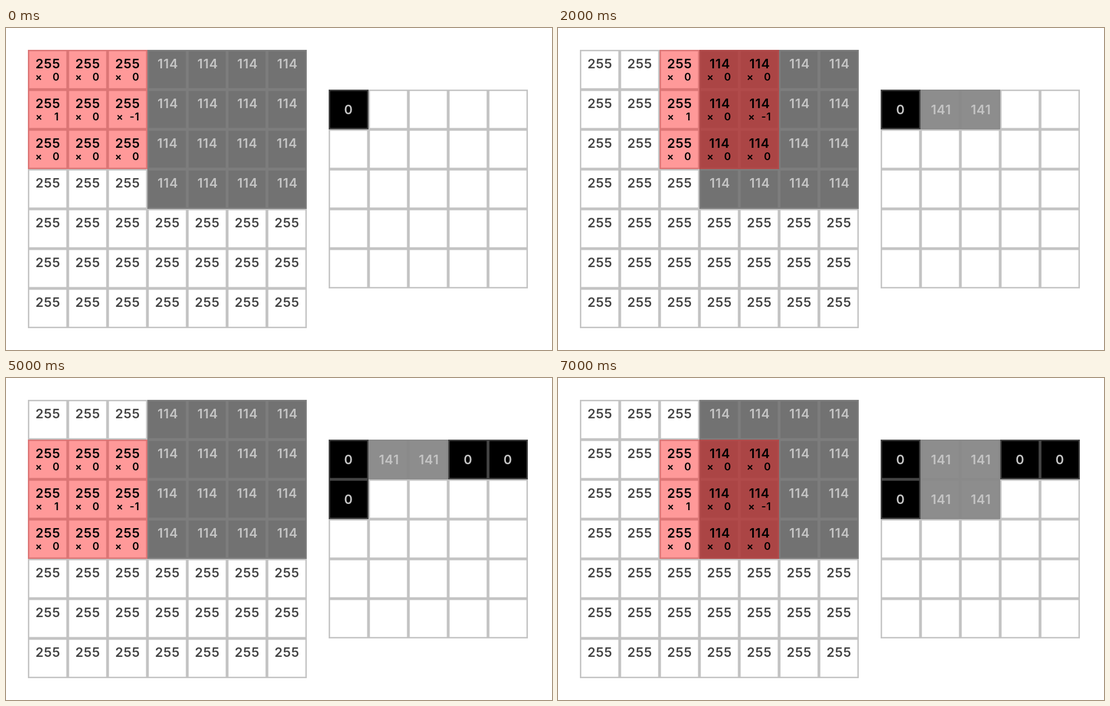
An HTML page with a canvas that plays this animation: 973x575 px, repeating every 8000 ms.

```html
<!DOCTYPE html>
<html lang="en">
<head>
<meta charset="utf-8">
<title>Convolution</title>
<style>
html, body { margin: 0; width: 100%; height: 100%; overflow: hidden; background: #fff; }
canvas { display: block; }
</style>
</head>
<body>
<canvas width="973" height="575"></canvas>
<script>
const ctx = document.querySelector("canvas").getContext("2d");
const CELL = 71, BORDER = 2.5, STEP = 1000, STEPS = 8, OUT = 5;
const INPUT = { x: 39, y: 39 }, OUTPUT = { x: 575, y: 110 };
const KERNEL = [[0, 0, 0], [1, 0, -1], [0, 0, 0]];

const pixel = (row, col) => row < 4 && col > 2 ? 114 : 255;

function convolve(row, col) {
  let sum = 0;
  KERNEL.forEach((line, r) => line.forEach((k, c) => sum += k * pixel(row + r, col + c)));
  return Math.abs(sum);
}

function text(str, x, y, size, color, align = "center") {
  ctx.font = `600 ${size}px Inter, sans-serif`;
  ctx.letterSpacing = "0.7px";
  ctx.textAlign = align;
  ctx.fillStyle = color;
  ctx.fillText(str, x, y);
}

function cell(x, y, value) {
  ctx.fillStyle = `rgb(${value}, ${value}, ${value})`;
  ctx.fillRect(x, y, CELL, CELL);
  ctx.strokeStyle = "rgba(136, 136, 136, 0.5)";
  ctx.lineWidth = BORDER;
  ctx.strokeRect(x + BORDER / 2, y + BORDER / 2, CELL - BORDER, CELL - BORDER);
}

function factor(k, x, y) {
  const signX = k < 0 ? 22 : k ? 20 : 19.5;
  text("×", x + signX, y + 55, 18.5, "#000");
  text(k, x + (k > 0 ? 55.5 : 57), y + 54.5, 18.5, "#000", "right");
}

function inputCell(row, col, k) {
  const x = INPUT.x + col * CELL, y = INPUT.y + row * CELL;
  const value = pixel(row, col), active = k !== undefined;
  cell(x, y, value);
  if (active) {
    ctx.fillStyle = "rgba(255, 0, 0, 0.4)";
    ctx.fillRect(x, y, CELL, CELL);
    factor(k, x, y);
  }
  const color = active ? "#000" : value > 200 ? "#444" : "#c4c4c4";
  const nudge = value === 114 && row !== 2 ? 1 : 0.3;
  text(value, x + CELL / 2 + nudge, y + 32.5, 23, color);
}

function outputCell(index, step) {
  const row = Math.floor(index / OUT), col = index % OUT;
  const x = OUTPUT.x + col * CELL, y = OUTPUT.y + row * CELL;
  if (index > step) return cell(x, y, 255);
  const value = convolve(row, col);
  cell(x, y, value);
  text(value, x + CELL / 2 + (value ? 1 : 0), y + 43.5, 23, "#c4c4c4");
}

function draw(now) {
  const step = Math.floor(now / STEP) % STEPS;
  const top = Math.floor(step / OUT), left = step % OUT;
  ctx.fillStyle = "#fff";
  ctx.fillRect(0, 0, 973, 575);
  for (let row = 0; row < 7; row++)
    for (let col = 0; col < 7; col++)
      inputCell(row, col, KERNEL[row - top]?.[col - left]);
  for (let i = 0; i < OUT * OUT; i++) outputCell(i, step);
  requestAnimationFrame(draw);
}
requestAnimationFrame(draw);
</script>
</body>
</html>
```
